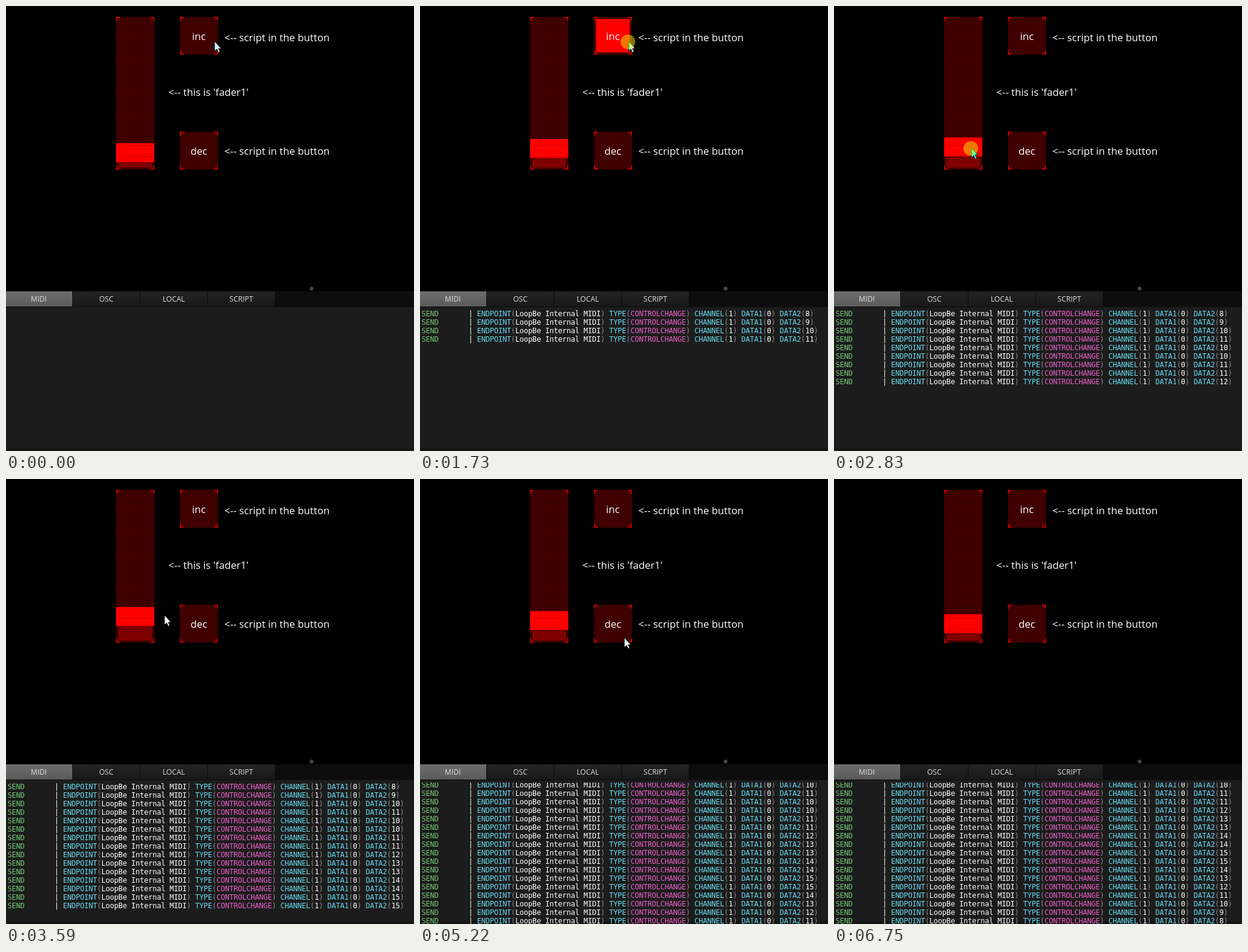
These frames come from a looping animation (671 px wide and 733 px high, 6940 ms). An HTML page:

```html
<!DOCTYPE html>
<html lang="en">
<head>
<meta charset="utf-8">
<title>Fader script demo</title>
<style>
  html, body { margin: 0; width: 100%; height: 100%; overflow: hidden; background: #000; }
  svg { display: block; width: 671px; height: 733px; }
  .ui { font: 16.7px "Open Sans", "Noto Sans", sans-serif; fill: #fff; }
  .tab { font: 12px "Open Sans", "Noto Sans", sans-serif; fill: #ddd; }
  .mid { text-anchor: middle; }
  .log { font: 12px "DejaVu Sans Mono", monospace; letter-spacing: -.215px; white-space: pre; fill: #8c8c8c; }
  .send { fill: #72c872; }
  .key { fill: #66d9ef; }
  .val { fill: #fff; }
  .type { fill: #ea5fc8; }
  .invert { fill: #fff; mix-blend-mode: difference; }
  .edge { fill: none; stroke: #000; stroke-width: .9; }
</style>
</head>
<body>
<svg viewBox="0 0 671 733">
  <defs>
    <linearGradient id="active" x2="0" y2="1"><stop stop-color="#6e6e6e"/><stop offset="1" stop-color="#5a5a5a"/></linearGradient>
    <linearGradient id="idle" x2="0" y2="1"><stop stop-color="#242424"/><stop offset="1" stop-color="#181818"/></linearGradient>
    <clipPath id="pane"><rect y="500" width="671" height="233"/></clipPath>
    <path id="arrow" d="M0 0V16.4L3.8 13 6.4 18.6 8.8 17.5 6.4 12H10.8Z"/>
  </defs>
  <rect width="671" height="733"/>
  <g id="controls"></g>
  <circle cx="502.5" cy="465.5" r="3.2" fill="#444"/>
  <rect y="470" width="671" height="26" fill="#0d0d0d"/>
  <rect y="496" width="671" height="237" fill="#1c1c1c"/>
  <rect y="728" width="671" height="5" fill="#161414"/>
  <g id="tabs"></g>
  <g clip-path="url(#pane)"><g id="lines"></g></g>
  <g id="cursor"><use href="#arrow" class="invert"/><use href="#arrow" class="edge"/></g>
  <circle id="halo" r="12" fill="#f0f000" fill-opacity=".5"/>
</svg>
<script>
const LOOP = 6940;
const $ = id => document.getElementById(id);

function add(parent, tag, attrs, text) {
  const el = document.createElementNS('http://www.w3.org/2000/svg', tag);
  for (const k in attrs) el.setAttribute(k, attrs[k]);
  if (text !== undefined) el.textContent = text;
  parent.appendChild(el);
  return el;
}

// Controls
const ui = $('controls');
const box = (x, y, width, height, fill) => add(ui, 'rect', { x, y, width, height, fill });
const label = (x, y, text, cls = 'ui') => add(ui, 'text', { x, y, class: cls }, text);

function corners(x, y, w, h) {
  const l = x + .8, t = y + .8, r = x + w - .8, b = y + h - .8, n = 5.5;
  add(ui, 'path', {
    d: `M${l} ${t + n}V${t}H${l + n}M${r - n} ${t}H${r}V${t + n}M${r} ${b - n}V${b}H${r - n}M${l + n} ${b}H${l}V${b - n}`,
    fill: 'none', stroke: '#f00000', 'stroke-width': 1.5
  });
}

function button(y, name) {
  box(286, y, 62.5, 62, '#400000');
  const lamp = box(289.5, y + 3.5, 55.5, 55, '#f00');
  corners(286, y, 62.5, 62);
  label(317.2, y + 38, name, 'ui mid');
  return lamp;
}

box(181, 18, 63, 251.5, '#400000');
const bar = box(185, 0, 55, 0, '#800000');
const thumb = box(181, 0, 63, 31.5, '#f00');
thumb.setAttribute('rx', 1.5);
for (let y = 39; y < 255; y += 19) add(ui, 'rect', { x: 187, y, width: 53, height: 1, 'fill-opacity': .2 });
corners(181, 18, 63, 251.5);
const inc = button(18, 'inc');
const dec = button(207.3, 'dec');
label(359, 58, '<-- script in the button');
label(267, 148, "<-- this is 'fader1'");
label(359, 245, '<-- script in the button');

['MIDI', 'OSC', 'LOCAL', 'SCRIPT'].forEach((name, i) => {
  add($('tabs'), 'rect', { x: 111 * i - (i ? 1 : 0), y: 470, width: i ? 110 : 109, height: 25, fill: `url(#${i ? 'idle' : 'active'})` });
  add($('tabs'), 'text', { x: 54 + 111 * i, y: 487, class: 'tab mid' }, name);
});

// Each press has a start, a moment it takes effect and an end
const click = (down, lamp, step) => ({ down, fire: down + 30, up: down + 100, lamp, step });
const incs = [190, 680, 1110, 1640].map(t => click(t, inc, 1));
const decs = [4270, 4710, 4900, 5100, 5290, 5480, 5720].map(t => click(t, dec, -1));
const drag = { down: 2530, fire: 2570, up: 3220 };
const presses = [...incs, drag, ...decs];

// Every message carries the whole part of the fader level
const events = [];
let level = 7;
const send = (t, to) => events.push({ t, level: level = to });
incs.forEach(p => send(p.fire, level + p.step));
for (let i = 0; i <= 10; i++) send(drag.fire + 60 * i, 10.24 + .555 * i);
decs.forEach(p => send(p.fire, level + p.step));

events.forEach((e, i) => {
  e.line = add($('lines'), 'text', { x: 2.6, y: 511 + 14 * i, class: 'log' });
  const put = (s, cls) => add(e.line, 'tspan', { class: cls }, s);
  const field = (key, val, cls = 'val') => { put(key, 'key'); put('('); put(val, cls); put(') '); };
  put('SEND       ', 'send');
  put('| ', 'val');
  field('ENDPOINT', 'LoopBe Internal MIDI');
  field('TYPE', 'CONTROLCHANGE', 'type');
  field('CHANNEL', 1);
  field('DATA1', 0);
  field('DATA2', Math.floor(e.level));
});

// Cursor moves: from, to, and where it comes to rest
const home = { x: 343, y: 58 };
const moves = [
  { from: 1770, to: 2300, x: 222, y: 237 },
  { from: drag.fire, to: drag.up, x: 233, y: 227 },
  { from: 3290, to: 3450, x: 260.5, y: 224 },
  { from: 3590, to: 3780, x: 328, y: 239 },
  { from: 3990, to: 4110, x: 336, y: 261 },
  { from: 6420, to: 6750, x: 690, y: 452 }
];
const ease = u => u * u * (3 - 2 * u);

function cursorAt(t) {
  let { x, y } = home;
  for (const m of moves) {
    const k = ease(Math.min(1, Math.max(0, (t - m.from) / (m.to - m.from))));
    x += (m.x - x) * k;
    y += (m.y - y) * k;
  }
  return { x, y };
}

const show = (el, on) => el.setAttribute('visibility', on ? 'visible' : 'hidden');
const move = (el, x, y) => el.setAttribute('transform', `translate(${x} ${y})`);

function draw(t) {
  const sent = events.filter(e => e.t <= t).length;
  const top = 238 - 1.732 * (sent ? events[sent - 1].level : 7);
  thumb.setAttribute('y', top);
  bar.setAttribute('y', top + 32.5);
  bar.setAttribute('height', 233.5 - top);

  events.forEach((e, i) => show(e.line, i < sent));
  move($('lines'), 0, -Math.max(0, 14 * sent - 235));

  const held = presses.find(p => t >= p.down && t < p.up);
  for (const lamp of [inc, dec]) show(lamp, held && held.lamp === lamp && t >= held.fire);

  const { x, y } = cursorAt(t);
  move($('cursor'), x, y);
  move($('halo'), x - 1, y + 1);
  show($('halo'), held);
}

const start = performance.now();
function tick() {
  draw((performance.now() - start) % LOOP);
  requestAnimationFrame(tick);
}
tick();
</script>
</body>
</html>
```
